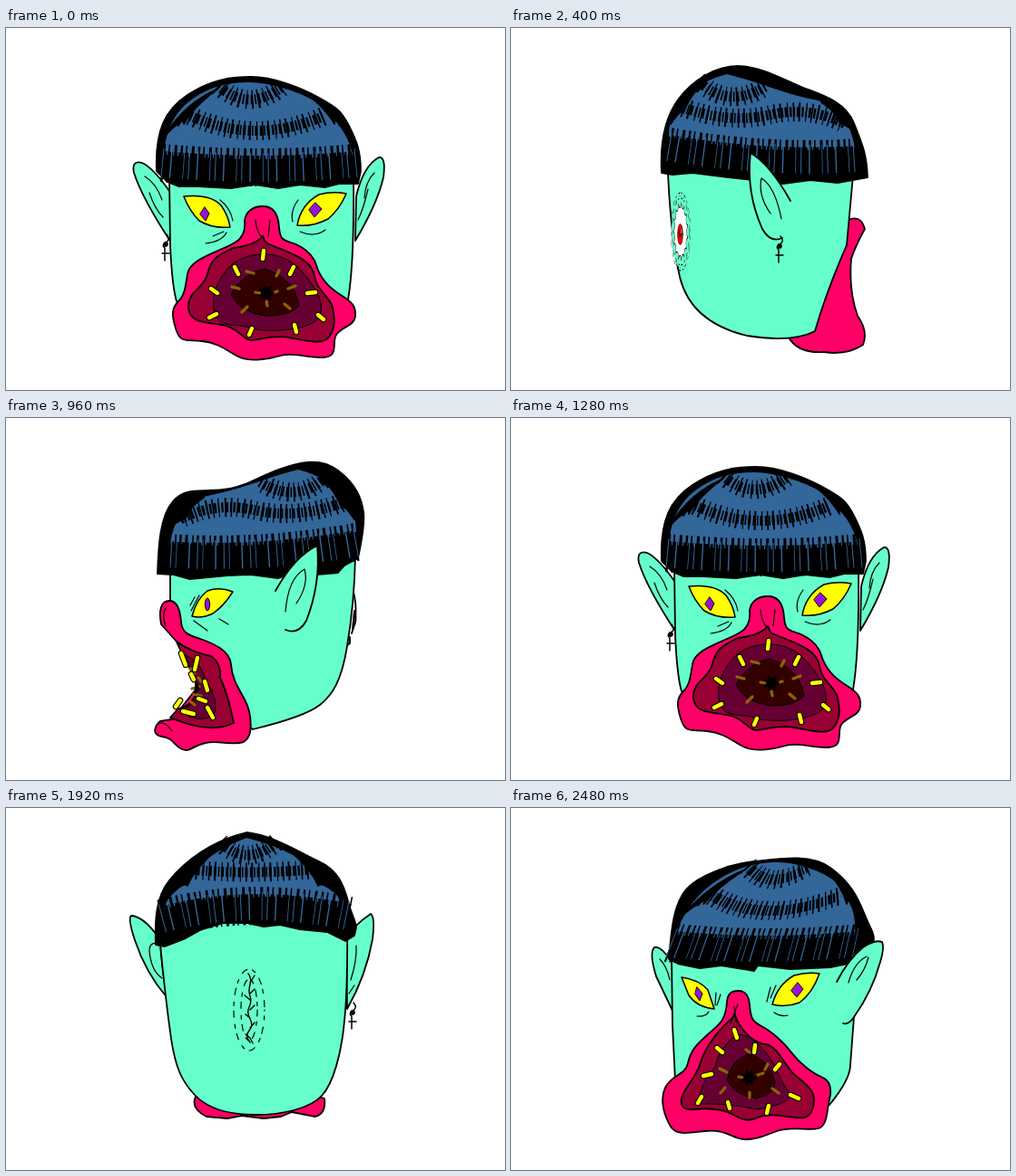
Recreate the animation shown at these times as an HTML page without scripts. Size 550 by 400 pixels, loop 2.56 s.

```html
<!DOCTYPE html>
<html lang="en">
<head>
<meta charset="utf-8">
<title>Turning head</title>
<style>
html, body { margin: 0; width: 100%; height: 100%; overflow: hidden; background: #fff }
svg { display: block; width: 550px; height: 400px; fill: none; stroke: #000; stroke-width: 1.8; stroke-linejoin: round; stroke-linecap: round }

.skin { fill: #6fc }
.hair { fill: #000 }
.blue { fill: #369; stroke: none }
.eye { fill: #ff0; stroke-width: 1.5 }
.iris { fill: #91d; stroke-width: 1 }
.lip { fill: #f06 }
.gum { fill: #903 }
.throat { fill: #603; stroke-width: 1 }
.pit { fill: #300; stroke-width: 1 }
.hole { fill: #000; stroke-width: 5; stroke-dasharray: 2 3; stroke-linecap: butt }
.thin { stroke-width: 1.2 }
.root { stroke-width: 6.5 }
.tooth { stroke: #ff0; stroke-width: 4.4 }
.stump { stroke: #860; stroke-width: 3.2 }

/* Hair strands: dashes lying across a guide line */
.lock { stroke-width: 11; stroke-dasharray: 2.4 2 1.6 1.8 3 2.4; stroke-linecap: butt }
.wisp { stroke-width: 21; stroke-dasharray: 1.6 4.6 2 6 1.2 5; stroke-linecap: butt }
.fringe { stroke-width: 26; stroke-dasharray: 4 1.2 6 1.6 3 1.4; stroke-linecap: butt }
.spike { stroke-width: 42; stroke-dasharray: 2.4 3.4 1.6 5 3 4; stroke-linecap: butt }
.glint { stroke: #369; stroke-width: 32; stroke-dasharray: 1 8 1.4 13 .8 5; stroke-linecap: butt }

.view { visibility: hidden; animation: show 1.28s step-end infinite; animation-delay: calc(var(--i) * 80ms - 1285ms) }
@keyframes show { 0% { visibility: visible } 6.25%, 100% { visibility: hidden } }

.wound { animation: orbit 1.28s -5ms step-end infinite }
@keyframes orbit {
  0% { visibility: hidden }
  31.25% { visibility: visible; transform: translate(187px, 225px) scale(.25, 1) }
  37.5% { visibility: visible; transform: translate(205px, 224px) scale(.6, 1) }
  43.75% { visibility: visible; transform: translate(234px, 223px) scale(.9, 1) }
  50% { visibility: visible; transform: translate(271px, 223px) }
  56.25% { visibility: visible; transform: translate(308px, 223px) scale(.9, 1) }
  62.5% { visibility: visible; transform: translate(345px, 224px) scale(.6, 1) }
  68.75% { visibility: visible; transform: translate(373px, 225px) scale(.25, 1) }
  75%, 100% { visibility: hidden }
}
.open { animation: squeeze 2.56s -5ms step-end infinite }
@keyframes squeeze {
  0%, 84.375%, 100% { transform: none }
  68.75%, 81.25% { transform: scale(.8, 1) }
  71.875%, 78.125% { transform: scale(.45, 1) }
  75% { transform: scale(0) }
}
.shut { opacity: 0; animation: seam 2.56s -5ms step-end infinite }
@keyframes seam { 0%, 78.125%, 100% { opacity: 0 } 75% { opacity: 1 } }
.lobes { stroke-dasharray: 0 13.8; stroke-width: 14 }
.flesh { stroke: #6fc; stroke-width: 11.5 }
.crease { stroke-width: 1.2; stroke-dasharray: 7 6 4 8 }
</style>
</head>
<body>
<svg viewBox="0 0 550 400">
<defs>
  <!-- Hair shine -->
  <path id="frontTop" d="M234 64Q268 94 306 64M203 97Q275 130 351 97"/>
  <path id="frontLow" d="M172 149Q280 159 386 149"/>
  <path id="sideTop" d="M206 64Q238 96 280 71M190 94Q240 112 285 102T368 112"/>
  <path id="sideLow" d="M174 137Q280 156 384 149"/>
  <path id="backTop" d="M236 38Q265 66 298 38M203 68Q265 74 336 68"/>
  <path id="backLow" d="M172 122Q268 96 378 119"/>
  <g id="front">
    <path class="blue" d="M174 140C176 112 186 92 206 78S245 60 268 60S330 72 344 84S376 112 382 140Q279 150 174 140Z"/>
    <path class="hair" d="M176 118Q196 84 232 68Q206 88 196 106Q196 98 190 108Q192 102 176 118ZM382 118Q362 84 326 68Q352 88 362 106Q362 98 368 108Q366 102 382 118Z"/>
    <use href="#frontTop" class="lock"/><use href="#frontTop" class="wisp"/>
    <use href="#frontLow" class="fringe"/><use href="#frontLow" class="spike"/><use href="#frontLow" class="glint"/>
  </g>
  <g id="side">
    <path class="blue" d="M174 126C174 98 190 70 238 57C275 66 300 79 338 86C362 93 374 110 379 138Q280 148 174 126Z"/>
    <path class="hair" d="M176 112Q184 80 212 66Q196 82 190 100Q188 94 176 112ZM376 118Q366 96 342 88Q358 98 362 110Z"/>
    <use href="#sideTop" class="lock"/><use href="#sideTop" class="wisp"/>
    <use href="#sideLow" class="fringe"/><use href="#sideLow" class="spike"/><use href="#sideLow" class="glint"/>
  </g>
  <g id="back">
    <path class="blue" d="M174 112C182 84 224 48 265 33C310 44 354 66 373 112Q320 94 268 99Q220 96 174 112Z"/>
    <path class="hair" d="M178 100Q196 68 228 50Q206 70 200 86Q196 80 178 100ZM368 98Q346 66 316 50Q338 70 344 86Q348 80 368 98Z"/>
    <use href="#backTop" class="lock"/><use href="#backTop" class="wisp"/>
    <use href="#backLow" class="fringe"/><use href="#backLow" class="spike"/><use href="#backLow" class="glint"/>
  </g>

  <!-- Teeth -->
  <path id="teeth0" d="M284 246l-1 9M252 264l4 8M317 264l-4 8M226 288l7 5M341 292l-9 1M232 316l-8 4M344 317l6 5M271 332l-3 7M318 328l2 8"/>
  <path id="teeth15" d="M246 245l3 9M227 265l6 5M269 262l-1 8M212 296l9-2M296 283l-5 6M210 319l-4 7M239 325l2 7M284 329l-2 8M308 317l9 4"/>
  <path id="teeth2" d="M337 248l-3 9M310 264l5 7M351 270l-7 2M288 291l7 3M358 292l-9 1M272 325l-5 5M303 330l2 8M338 328l3 7M364 318l6 3"/>
  <path id="teeth3" d="M347 246l-7 6M325 256l3 8M338 265l14-1M317 266l3 7M327 296l7-3M343 293l12 2M344 322l11-2M331 324v11M295 336l-5 5"/>
  <path id="teeth12" d="M193 260l5 13M211 265l-3 13M207 289l-3-6M219 291l3 10M192 312l-5 7M195 324l12 3M222 320l6 11M212 310l8 3"/>

  <g id="ring">
    <path d="M1-7q5 6-1 9q-5 3-1 6v14M-4 14h8" style="stroke-width:1.5"/>
    <circle cy="4" r="2" class="hair"/>
  </g>

  <!-- Views, each a step of the turn -->
  <g id="v0">
    <path class="skin" d="M182 183Q163 155 150 149Q138 146 141 160Q150 188 182 237ZM386 186Q394 152 411 143Q419 142 416 165Q409 195 385 235Z"/>
    <path class="thin" d="M153 164Q166 172 172 190M158 182Q164 200 173 209M406 160Q396 170 395 188M399 178Q394 200 388 212"/>
    <path class="skin" d="M180 165L181 240Q183 285 188 302L280 330L377 300Q384 260 383 165Z"/>
    <path class="hair" d="M166 158C164 112 176 90 200 74S245 54 270 54S325 66 345 77S370 92 378 108S391 135 391 158L388 172L368 172L352 176L324 173L300 177L275 173L248 177L212 175L190 175L178 170Z"/>
    <use href="#front"/>
    <path class="eye" d="M196 186Q225 183 237 196Q245 207 247 220Q228 222 213 213Q202 202 196 186ZM321 218Q325 195 345 184Q360 180 375 183Q368 200 355 211Q338 220 321 218Z"/>
    <path class="iris" d="M219 198l5 7l-4 8l-6-7ZM341 193l7 7l-8 9l-6-8Z"/>
    <path class="thin" d="M236 190Q248 200 250 213M220 238Q238 236 243 226M228 230l12-5M322 190Q313 202 316 214M324 225Q340 232 352 223"/>
    <path class="lip" d="M263 213C264 203 272 197 283 197S300 204 301 220C302 232 304 234 314 237S338 248 342 262S356 287 369 295S386 308 385 319S366 331 363 341S366 363 350 364S316 358 303 362S270 369 258 364S236 348 216 346S192 348 187 332S183 309 190 302S198 285 200 272S220 252 236 245S265 234 263 213Z"/>
    <path class="gum" d="M283 230Q275 240 250 243C232 252 226 255 222 272S200 290 201 309S226 325 242 329S262 346 272 345S295 339 312 342S350 352 357 340S362 320 360 309S342 290 340 274S318 250 300 243S287 238 283 230Z"/>
    <path class="throat" d="M284 250C262 250 248 260 241 270S225 295 230 314S255 326 268 331S316 336 336 327S346 295 335 280S310 250 284 250Z"/>
    <path class="pit" d="M285 266Q262 270 248 294Q256 314 286 318Q312 319 323 307Q318 276 285 266Z"/>
    <path class="stump" d="M265 269l8 2M301 268l-3 6M249 286l8 2M319 285l-8 3M266 308l-6 6M307 305l6 5M275 292l5 1M293 293l6-2M287 302l1 5"/>
    <circle class="hole" cx="287" cy="293" r="6"/>
    <path class="thin" d="M275 212Q276 225 282 231M291 212l-2 18"/>
    <use href="#teeth0" class="root"/><use href="#teeth0" class="tooth"/>
  </g>
  <g id="v15">
    <path class="skin" d="M178 172Q166 152 158 154Q152 160 160 186L178 224Z"/>
    <path class="skin" d="M177 165L178 240L181 302L260 340L351 328Q374 300 374 284L378 231V165Z"/>
    <path class="hair" d="M174 167C177 130 180 105 193 90S240 62 268 59S330 50 352 66S382 98 390 118S400 136 400 148L385 157L371 172L352 176L308 178L272 174L268 180L232 174L208 177L184 172Z"/>
    <use href="#front" transform="matrix(.95 0 -.3 1 58 0)"/>
    <path class="skin" d="M359 192Q372 167 388 154Q401 145 409 148Q412 154 407 170Q398 203 378 231Q372 240 366 238"/>
    <path class="thin" d="M164 167Q172 175 175 190M372 193Q378 171 392 164M394 165Q390 180 381 190"/>
    <path class="eye" d="M188 187Q208 190 217 201L224 222Q205 220 196 207ZM288 217Q294 195 312 185Q326 181 340 183Q332 205 318 215Q303 221 288 217Z"/>
    <path class="iris" d="M205 198l6 7l-3 8l-5-7ZM316 193l6 7l-7 9l-6-7Z"/>
    <path class="thin" d="M226 204l-1 14M231 206l-4 12M205 230q10 1 13-5M286 198l-4 16M292 196l-6 14M290 226q7 5 15 3"/>
    <path class="lip" d="M238 214C239 204 244 202 251 202S262 206 263 217C264 232 266 236 276 241S300 258 309 270S332 293 342 297S354 310 351 322S349 351 339 354S308 351 293 357S263 369 251 365S232 355 214 357S182 362 176 352S163 324 170 309S192 296 195 282S204 262 216 251S237 236 238 214Z"/>
    <path class="gum" d="M247 229C240 236 233 241 225 252S212 270 208 284S190 310 188 321S194 334 202 333S230 331 243 338S262 347 272 342S298 340 312 342S333 340 334 324S316 300 308 290S292 262 280 261S252 245 247 229Z"/>
    <path class="throat" d="M249 250Q229 265 225 286Q208 302 207 327Q240 326 270 333Q305 328 308 317Q295 298 291 285Q270 250 249 250Z"/>
    <path class="pit" d="M262 272Q242 278 238 301Q248 318 270 321Q292 316 291 303Q285 277 262 272Z"/>
    <path class="stump" d="M259 267l4 3M230 288l8 4M283 283l-3 6M236 309l-5 6M288 310l7 5M263 314v6M251 297l6 1M272 295l6-2"/>
    <circle class="hole" cx="262" cy="298" r="6"/>
    <path class="thin" d="M246 219l2 17M242 238L250 217"/>
    <use href="#teeth15" class="root"/><use href="#teeth15" class="tooth"/>
  </g>
  <g id="v2">
    <path class="skin" d="M170 165Q172 240 180 276Q192 312 240 338L320 345L372 262L383 165Z"/>
    <path class="hair" d="M163 160C163 125 168 97 182 82S225 54 252 53S315 68 345 76S376 98 384 120S392 155 390 172L350 175L312 173L290 178L250 174L210 176L180 170Z"/>
    <use href="#side"/>
    <path class="skin" d="M212 190Q186 150 169 146Q160 148 166 178Q178 214 202 235Q209 238 212 232"/>
    <path class="thin" d="M186 193Q174 171 179 163Q190 164 200 190"/>
    <path class="eye" d="M252 184Q279 182 292 197L306 219Q283 223 268 212Q257 200 252 184ZM358 218Q360 197 380 187Q380 205 369 215Z"/>
    <path class="iris" d="M283 195l5 8l-3 9l-6-8ZM369 198l3 6l-4 7l-2-6Z"/>
    <path class="thin" d="M306 202l5 14M287 231q13 2 20-5M354 203l1 13"/>
    <path class="lip" d="M323 212C326 203 331 202 338 203S350 210 350 222S363 248 369 266S380 295 388 307S402 348 380 350S352 360 338 365S316 360 305 357S274 361 258 360S235 345 237 330S248 306 256 296S272 264 288 250S319 238 323 212Z"/>
    <path class="gum" d="M340 230C326 238 310 247 300 258S280 290 268 302S254 338 268 338S300 338 320 345S375 342 380 334S380 316 370 300S352 262 340 230Z"/>
    <path class="throat" d="M340 250Q312 262 300 285Q282 305 274 328Q300 338 325 334Q352 332 358 312Q356 275 340 250Z"/>
    <ellipse class="pit" cx="311" cy="299" rx="23" ry="24"/>
    <path class="stump" d="M314 275l2 5M329 285l-4 5M294 311l-5 5M322 314l4 5"/>
    <circle class="hole" cx="308" cy="299" r="6"/>
    <use href="#teeth2" class="root"/><use href="#teeth2" class="tooth"/>
  </g>
  <g id="v3">
    <path class="skin" d="M175 163Q180 220 184 262C188 300 198 312 216 324S250 342 268 346L350 320L383 235L380 198L383 188L379 165Z"/>
    <path class="hair" d="M166 157C164 120 167 92 178 76S210 50 240 52S295 72 320 74S370 84 380 108S393 140 394 170L388 174L360 171L334 174L312 172L308 177L262 171L232 174L200 168L178 168Z"/>
    <use href="#side"/>
    <path class="skin" d="M233 187Q203 147 191 145Q181 147 185 172Q196 210 218 229Q225 235 229 232"/>
    <path class="thin" d="M203 187Q191 172 201 160Q213 160 220 189"/>
    <path class="eye" d="M284 184Q310 182 323 198L336 221Q312 224 299 212Q287 198 284 184ZM374 219Q372 205 382 190Q383 206 374 219Z"/>
    <ellipse class="iris" cx="314" cy="206" rx="2.6" ry="7"/>
    <path class="thin" d="M332 203l5 14M317 235l15-9M315 229l17-4M378 199l-3 13"/>
    <path class="lip" d="M346 213C348 208 354 207 361 207S371 212 371 222S382 240 384 260S382 295 389 309S403 330 402 343S386 355 372 351C362 362 358 366 346 366S322 351 308 357S280 362 269 358S262 330 268 320S288 295 294 272S315 248 330 243S346 230 346 213Z"/>
    <path class="gum" d="M368 229Q340 240 322 258Q308 282 298 308L286 334V345Q315 347 340 336Q365 344 383 337Q384 318 374 300Q373 265 368 229Z"/>
    <path class="throat" d="M346 243Q320 259 310 283L290 326Q300 343 337 335Q355 340 363 329Q352 304 358 282Z"/>
    <path class="pit" d="M317 274Q330 283 327 318Q310 330 291 325Q303 305 317 274Z"/>
    <path class="stump" d="M318 287l4 4M304 315l-4 5M318 311l4 4"/>
    <ellipse class="hole" cx="307" cy="301" rx="4" ry="8"/>
    <path class="thin" d="M363 222Q354 225 347 229M340 336Q368 331 383 337M366 232Q357 268 366 300"/>
    <use href="#teeth3" class="root"/><use href="#teeth3" class="tooth"/>
  </g>
  <g id="v12">
    <path class="skin" d="M376 244l3-2v7l-4 3"/>
    <path d="M383 192q6 25-2 46" style="fill:#fff"/>
    <path d="M384 213q4 10-2 20Z" style="fill:#f00"/>
    <path class="skin" d="M385 152Q384 205 376 252C370 290 360 306 346 317S305 336 272 344L215 300L188 235L181 205V165Z"/>
    <path class="hair" d="M167 172C168 140 170 108 184 92S215 82 240 79S280 64 300 57S345 42 366 58S392 90 394 104S391 140 388 155L373 163L366 171L342 173L320 171L300 177L270 173L244 174L202 178L184 173Z"/>
    <use href="#side" transform="translate(560) scale(-1 1)"/>
    <path class="skin" d="M297 191Q318 153 343 141Q347 183 331 224Q322 240 308 234"/>
    <path class="thin" d="M308 214Q311 177 329 167Q334 184 320 205"/>
    <path class="eye" d="M205 219Q210 200 222 191Q235 186 250 192Q240 208 228 216Q216 222 205 219Z"/>
    <ellipse class="iris" cx="222" cy="206" rx="2.6" ry="7"/>
    <path class="thin" d="M204 213l9-17M203 207l5-9M207 224l15 11M235 222l10 6"/>
    <path class="lip" d="M171 228C168 212 171 202 180 202S192 212 193 225S202 240 214 244S247 256 248 272S256 298 263 311S276 357 257 359S235 356 220 359S203 370 194 366S185 354 172 352S165 339 170 335L183 333L213 295L188 247Z"/>
    <path class="gum" d="M188 247Q205 259 226 263Q238 272 236 287Q245 306 251 337Q225 350 181 331L190 321Q205 320 213 296L196 265Z"/>
    <path class="throat" d="M198 262Q215 269 220 290Q236 312 229 329Q210 338 193 324L207 314L211 295Z"/>
    <path class="stump" d="M203 277l5 5M212 287l3 4M205 299l8-2M207 305l8 2M203 313l5 4"/>
    <path class="hair" d="M209 292l4 8l-5 4l1-6Z"/>
    <path class="thin" d="M177 209Q171 217 176 230M168 338q7-4 15 8"/>
    <use href="#teeth12" class="root"/><use href="#teeth12" class="tooth"/>
  </g>
  <g id="v5">
    <path class="lip" d="M366 215Q385 203 390 222Q380 240 375 255Q372 290 382 318Q394 335 388 350Q370 362 345 358Q315 360 305 340L350 250Z"/>
    <path class="skin" d="M172 130Q174 220 186 275Q198 325 260 340Q310 348 335 335Q348 290 370 240L380 130"/>
    <path class="hair" d="M166 160C164 125 170 98 185 78S225 42 250 42S300 57 320 65S368 80 378 105S392 140 393 165L360 171L330 168L300 172L240 165L200 160L178 162Z"/>
    <use href="#side" transform="translate(0 -6)"/>
    <path class="skin" d="M308 191Q285 150 264 138Q259 182 277 222Q286 238 299 232"/>
    <path class="thin" d="M298 211Q291 175 276 166Q272 185 286 205"/>
  </g>
  <g id="v6">
    <path class="lip" d="M372 235Q384 250 374 280Q378 310 378 340Q360 356 320 352Q280 354 262 338L350 260Z"/>
    <path class="skin" d="M170 110Q174 220 186 275Q200 325 255 338Q310 344 340 325Q365 290 375 225L378 110"/>
    <path class="hair" d="M165 158C164 120 170 92 190 70S230 38 262 37S320 55 345 66S385 110 390 150L372 160L320 158L285 150L240 150L200 157Z"/>
    <use href="#back" transform="translate(0 12)"/>
    <path class="skin" d="M328 190Q333 150 350 130Q364 140 362 170Q358 208 338 232Q330 234 328 225"/>
    <path class="thin" d="M340 205Q350 180 349 155"/>
  </g>
  <g id="v7">
    <path class="lip" d="M235 328Q238 346 270 344Q320 350 360 342Q368 325 358 305Z"/>
    <path class="skin" d="M174 147Q158 128 150 128Q146 150 177 206Z"/>
    <path class="skin" d="M170 110Q175 220 186 275Q205 328 265 339Q325 340 352 305Q372 270 376 215V110"/>
    <path class="hair" d="M165 153C165 120 170 90 187 72S228 40 264 34S330 54 352 66S382 105 387 140L372 152L340 143L290 135L240 136L215 141L176 155Z"/>
    <use href="#back" transform="translate(0 6)"/>
    <path class="skin" d="M360 170Q370 132 388 120Q398 128 392 155Q385 195 364 226"/>
    <path class="thin" d="M369 195Q378 170 378 150"/>
  </g>
  <g id="v8">
    <path class="lip" d="M209 319Q203 332 221 341L244 343L260 340L284 343L303 341L315 336L341 341Q353 338 351 321L280 300Z"/>
    <path class="skin" d="M168 143Q152 120 138 119Q134 122 142 146Q154 182 177 209ZM375 144Q385 128 402 117Q407 120 404 145Q397 185 376 222Z"/>
    <path class="skin" d="M170 110V150Q175 205 182 255C187 288 194 302 208 317S245 339 275 339S335 332 348 318S370 270 373 235Q377 200 376 110"/>
    <path class="skin" d="M169 150Q158 147 158 158Q160 180 172 188" style="stroke-width:1.3"/>
    <path class="thin" d="M386 152Q387 168 380 190M378 205l6-9"/>
    <path class="hair" d="M165 151C164 125 165 98 180 80S222 38 265 27C295 30 325 50 345 59S372 84 377 103S385 122 386 132L384 141L374 147L354 137L324 134L302 129L284 131L266 127L240 127L214 135L196 145L175 153Z"/>
    <use href="#back"/>
  </g>
</defs>

<g class="view" style="--i:0"><use href="#v0"/><use href="#ring" x="176" y="235"/></g>
<g class="view" style="--i:1"><use href="#v15" transform="translate(560) scale(-1 1)"/><use href="#ring" x="187" y="240"/></g>
<g class="view" style="--i:2"><use href="#v2"/><use href="#ring" x="207" y="238"/></g>
<g class="view" style="--i:3"><use href="#v3"/><use href="#ring" x="224" y="237"/></g>
<g class="view" style="--i:4"><use href="#v12" transform="translate(560) scale(-1 1)"/><use href="#ring" x="249" y="239"/></g>
<g class="view" style="--i:5"><use href="#v5"/><use href="#ring" x="296" y="237"/></g>
<g class="view" style="--i:6"><use href="#v6"/><use href="#ring" x="336" y="236"/></g>
<g class="view" style="--i:7"><use href="#v7"/><use href="#ring" x="369" y="230"/></g>
<g class="view" style="--i:8"><use href="#v8"/><use href="#ring" x="382" y="222"/></g>
<g class="view" style="--i:9"><use href="#v7" transform="translate(560) scale(-1 1)"/></g>
<g class="view" style="--i:10"><use href="#v6" transform="translate(560) scale(-1 1)"/></g>
<g class="view" style="--i:11"><use href="#v5" transform="translate(560) scale(-1 1)"/></g>
<g class="view" style="--i:12"><use href="#v12"/></g>
<g class="view" style="--i:13"><use href="#v3" transform="translate(560) scale(-1 1)"/></g>
<g class="view" style="--i:14"><use href="#v2" transform="translate(560) scale(-1 1)"/></g>
<g class="view" style="--i:15"><use href="#v15"/></g>

<g class="wound">
  <g class="open">
    <circle r="33" style="fill:#fff;stroke:none"/>
    <circle class="lobes" r="33"/>
    <circle class="lobes flesh" r="33"/>
    <circle class="flesh" r="36" style="stroke-width:7"/>
    <circle class="crease" r="37"/>
    <circle class="crease" r="43" stroke-dashoffset="8"/>
    <circle cx="-2" cy="3" r="11.5" style="fill:#f00;stroke-width:1"/>
    <circle cx="-2" cy="2" r="3.5" class="hair"/>
    <path d="M0 2l2-4" style="stroke:#fff;stroke-width:1"/>
  </g>
  <g class="shut">
    <path d="M-4-40q4 5 2 12t0 13t-1 12t1 13t-1 13t1 13M3-38l-5 8M3-23l-5 5M-8-16l6 5M3-5l-5 5M-7 5l5 4M3 14l-5 6M-7 27l5 4l3 6" style="stroke-width:1.4"/>
    <ellipse class="crease" cx="-3" rx="9" ry="34"/>
    <ellipse class="crease" cx="-3" rx="17" ry="45" stroke-dashoffset="6"/>
  </g>
</g>
</svg>
</body>
</html>
```
